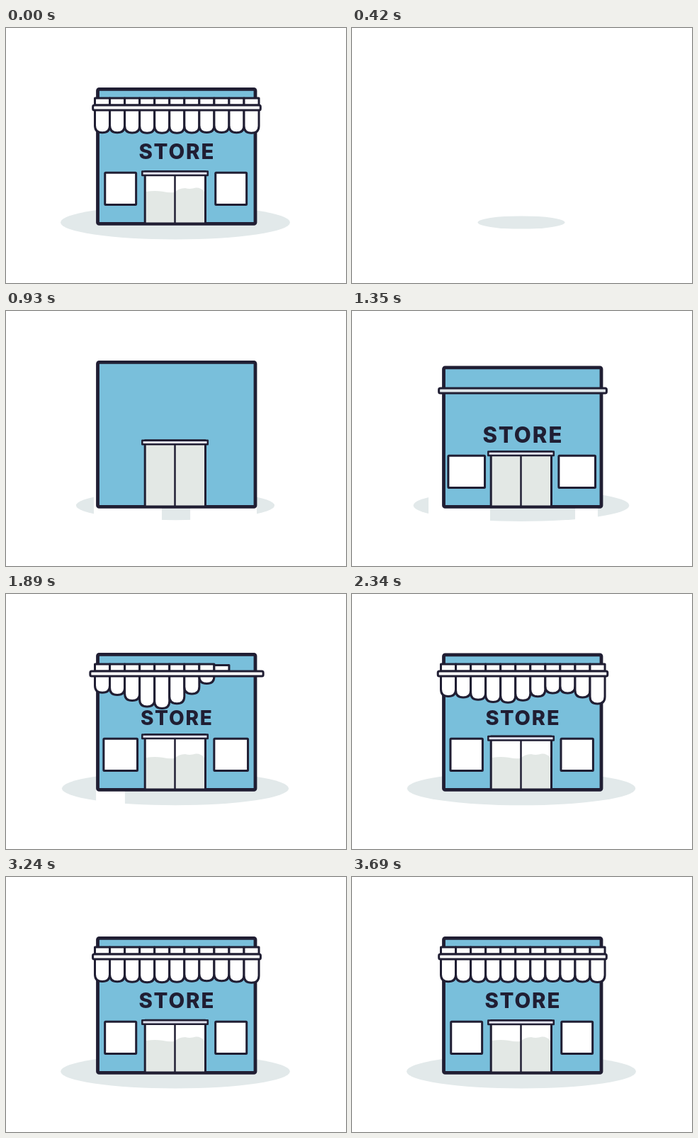
Recreate the animation shown at these times as an HTML page. Size 480 by 360 pixels, loop 3.72 s.

```html
<!DOCTYPE html>
<html lang="en">
<head>
<meta charset="utf-8">
<title>Store</title>
<style>
  html, body { margin: 0; width: 100%; height: 100%; overflow: hidden; background: #fff; }
  svg { display: block; width: 480px; height: 360px; }
  .ink { stroke: #201e33; stroke-width: 3; stroke-linejoin: round; }
  text { font: 800 29.5px Inter, Roboto, sans-serif; letter-spacing: 1.9px; fill: #201e33; text-anchor: middle; }
</style>
</head>
<body>
<svg viewBox="0 0 480 360">
  <ellipse id="shadow" cx="239" cy="274.5" fill="#e2e9ea"/>
  <rect id="gapL" y="255" height="52" rx="9" fill="#fff"/>
  <rect id="gapR" y="255" height="52" rx="9" fill="#fff"/>
  <rect id="wall" class="ink" x="129.5" width="222.5" rx="2" fill="#79bfdb" style="stroke-width:4.8"/>
  <g id="door">
    <rect id="panes" class="ink" x="196.2" width="85.3" fill="#e3e8e5"/>
    <path id="glare" fill="#fff" d="M198 203H280V231Q275 225 268 225.5Q260 228 253 226Q244 226 238 232Q230 233 222 231Q210 229 198 231Z"/>
    <path id="split" class="ink" style="stroke-width:2.5"/>
    <rect id="lintel" class="ink" x="192.3" width="92.5" height="5.5" fill="#e2e3f0" style="stroke-width:2.5"/>
  </g>
  <rect id="winL" class="ink" y="204.2" height="45.3" rx="1" fill="#fff"/>
  <rect id="winR" class="ink" y="204.2" height="45.3" rx="1" fill="#fff"/>
  <g id="sign"><text x="0.4" y="10.4">STORE</text></g>
  <g id="awning"></g>
  <rect id="bar" class="ink" y="109" height="7" rx="2"/>
</svg>
<script>
  const LOOP = 3.72, CUT = 0.285, FLAPS = 11, FLAP_W = 21.05;
  const $ = id => document.getElementById(id);
  const set = (el, attrs) => { for (const k in attrs) el.setAttribute(k, attrs[k]); };
  const show = (el, on) => { el.style.display = on ? '' : 'none'; };

  // Linear growth to size, reached at time end, then a damped swing.
  function spring(t, end, dur, size, amp) {
    const u = t - end;
    if (u < 0) return Math.max(0, size * (1 + u / dur));
    return size + amp * Math.sin(2 * Math.PI * 2.2 * u) * Math.exp(-2 * u);
  }

  // Piecewise linear value through [time, left, right] rows.
  function between(rows, t) {
    if (t <= rows[0][0] || t >= rows[rows.length - 1][0]) return [0, 0];
    const i = rows.findIndex(r => r[0] > t), a = rows[i - 1], b = rows[i];
    const p = (t - a[0]) / (b[0] - a[0]);
    return [a[1] + (b[1] - a[1]) * p, a[2] + (b[2] - a[2]) * p];
  }

  const GAP_L = [[0.78, 170, 170], [0.93, 124, 220], [1.35, 108, 195], [1.89, 127, 168], [2.1, 148, 148]];
  const GAP_R = [[0.78, 310, 310], [0.93, 260, 354], [1.35, 315, 347], [1.65, 330, 330]];

  function addPath() {
    const p = document.createElementNS('http://www.w3.org/2000/svg', 'path');
    set(p, { class: 'ink', fill: '#fff' });
    $('awning').append(p);
    return p;
  }
  const flaps = Array.from({ length: FLAPS }, () => ({ top: addPath(), low: addPath() }));

  function drawSpan(el, mid, half) {
    show(el, half > 1);
    set(el, { x: mid - half, width: 2 * half });
  }

  function drawGap(el, rows, t) {
    const [a, b] = between(rows, t);
    show(el, b > a);
    set(el, { x: a, width: b - a });
  }

  // The piece above the bar rises first, then the flap drops.
  function drawFlap({ top, low }, i, t) {
    const end = 1.56 + 0.06 * i;
    const rise = spring(t, end - 0.14, 0.06, 10, 0);
    const drop = spring(t, end, 0.14, 34, 17);
    const x = 125.5 + i * FLAP_W, r = x + FLAP_W;
    show(top, rise > 0);
    show(low, drop > 2);
    set(top, { d: `M${x} 109V${109 - rise}H${r}V109Z` });
    const y = 114 + drop, c = Math.min(10, drop), k = c * 0.3;
    set(low, { d: `M${x} 114V${y - c}C${x} ${y - k} ${x + 4} ${y} ${x + FLAP_W / 2} ${y}S${r} ${y - k} ${r} ${y - c}V114Z` });
  }

  function draw(t) {
    if (t < CUT) t += LOOP;

    const rx = spring(t, 0.57, 0.24, 162, 47);
    set($('shadow'), { rx, ry: rx * 0.148 });
    drawGap($('gapL'), GAP_L, t);
    drawGap($('gapR'), GAP_R, t);

    const wall = spring(t, 0.79, 0.24, 190, 20);
    show($('wall'), wall > 0);
    set($('wall'), { y: 276.4 - wall, height: wall });

    const door = spring(t, 0.87, 0.22, 73.5, 30), y = 276 - door;
    show($('door'), door > 0);
    set($('panes'), { y, height: door });
    set($('split'), { d: `M238.5 ${y}V275.5` });
    set($('lintel'), { y });
    show($('glare'), t > 1.6);

    const win = spring(t, 1.3, 0.24, 21.9, 6.7);
    drawSpan($('winL'), 161.7, win);
    drawSpan($('winR'), 317.7, win);

    const sign = spring(t, 1.145, 0.2, 1, 0.28);
    show($('sign'), sign > 0);
    set($('sign'), { transform: `translate(241 174.7) scale(${sign})` });

    drawSpan($('bar'), 241, spring(t, 1.35, 0.24, 118.2, 12.5));
    set($('bar'), { fill: t < 1.5 ? '#dfe6e9' : '#fff' });
    flaps.forEach((f, i) => drawFlap(f, i, t));
  }

  const start = performance.now();
  function tick(now) {
    draw(Math.max(0, now - start) / 1000 % LOOP);
    requestAnimationFrame(tick);
  }
  draw(0);
  requestAnimationFrame(tick);
</script>
</body>
</html>
```
